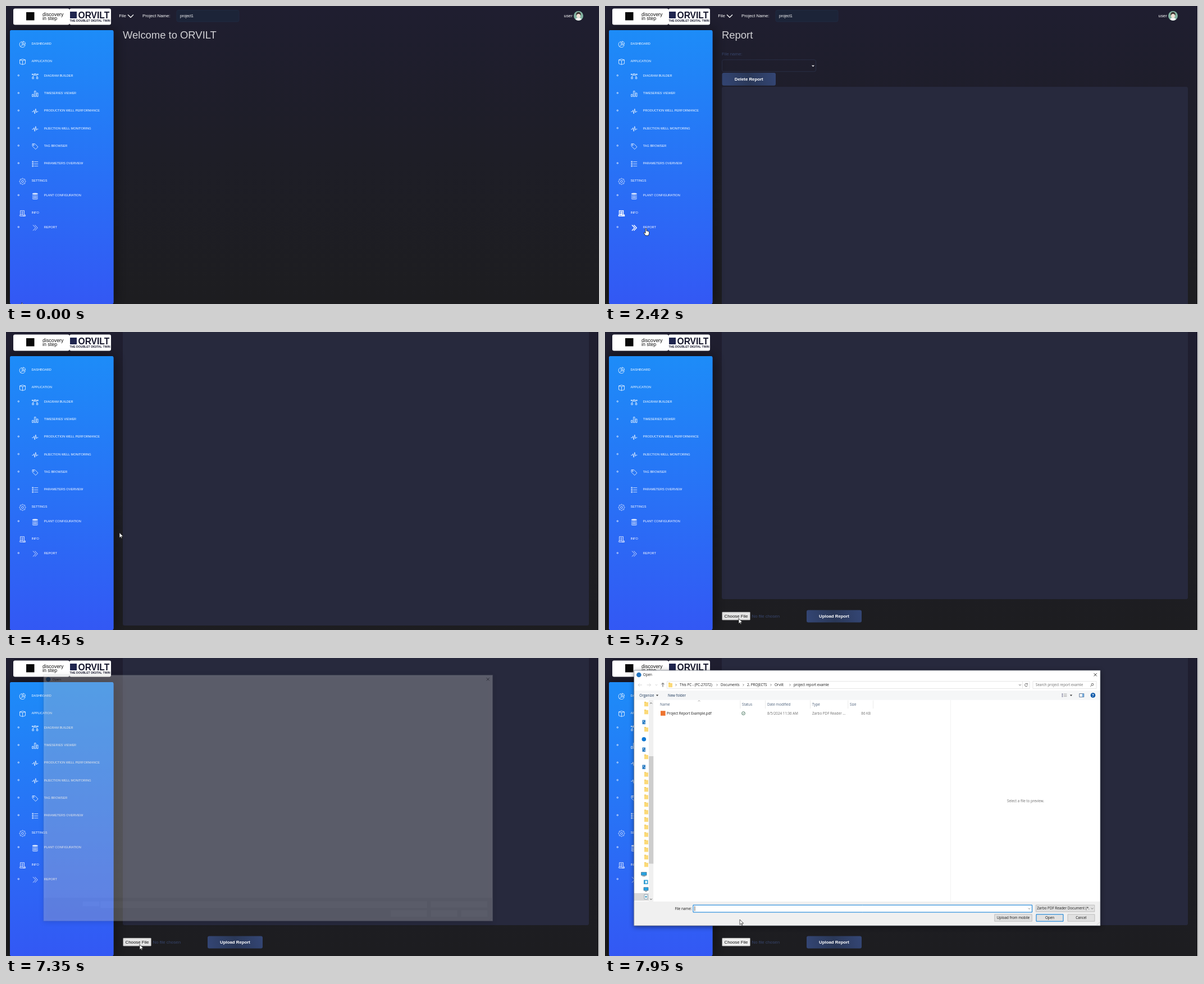
An HTML page with a canvas that plays this animation: 1056 by 531 pixels, repeating every 8 s.

```html
<!DOCTYPE html>
<html lang="en">
<head>
<meta charset="utf-8">
<title>Report upload</title>
<style>
  html, body { margin: 0; width: 100%; height: 100%; overflow: hidden; background: #1e1e26; }
  canvas { display: block; }
</style>
</head>
<body>
<canvas id="stage" width="1056" height="531"></canvas>
<script>
const ctx = document.getElementById('stage').getContext('2d');
const W = 1056, H = 531, LOOP = 8000, SCROLL = 224;
const APP = '"Liberation Sans", Arial, sans-serif';
const SYS = '"Open Sans", "Noto Sans", sans-serif';
const PAGE_AT = 2160, DIALOG_AT = 7350, LISTING_AT = 7590;

const clamp = v => Math.max(0, Math.min(1, v));
const smooth = v => { v = clamp(v); return v * v * (3 - 2 * v); };

function text(s, x, y, size, color = '#fff', opt = {}) {
  ctx.font = `${opt.weight || 400} ${size}px ${opt.font || APP}`;
  ctx.textAlign = opt.align || 'left';
  ctx.fillStyle = color;
  ctx.fillText(s, x, y);
}
const sys = (s, x, y, color = '#1a1a1a', align = 'left') =>
  text(s, x, y, 6.25, color, { font: SYS, align });

function rect(x, y, w, h, fill, stroke, r = 0, lw = 1) {
  ctx.beginPath();
  ctx.roundRect(x, y, w, h, r);
  if (fill) { ctx.fillStyle = fill; ctx.fill(); }
  if (stroke) { ctx.strokeStyle = stroke; ctx.lineWidth = lw; ctx.stroke(); }
}

function disc(x, y, r, fill, stroke, lw = 1) {
  ctx.beginPath();
  ctx.arc(x, y, r, 0, Math.PI * 2);
  if (fill) { ctx.fillStyle = fill; ctx.fill(); }
  if (stroke) { ctx.strokeStyle = stroke; ctx.lineWidth = lw; ctx.stroke(); }
}

function path(d, x, y, stroke, lw = 0.9, fill) {
  const p = new Path2D(d);
  ctx.save();
  ctx.translate(x, y);
  if (fill) { ctx.fillStyle = fill; ctx.fill(p); }
  if (stroke) { ctx.strokeStyle = stroke; ctx.lineWidth = lw; ctx.stroke(p); }
  ctx.restore();
}

function gradient(x0, y0, x1, y1, ...colors) {
  const g = ctx.createLinearGradient(x0, y0, x1, y1);
  colors.forEach((c, i) => g.addColorStop(i / (colors.length - 1), c));
  return g;
}

// Icon outlines, centred on 0,0
const ICONS = {
  pie: 'M-1 -4.6A5 5 0 1 0 4.6 1.2L-.6 1.2ZM1 -5.4V-.6H5.2A5 5 0 0 0 1 -5.4M-.6 1.2L-3.8 4',
  cube: 'M-5 -3.4L0 -4.8L5 -3.4V3.4L0 5L-5 3.4ZM-5 -3.4L0 -2L5 -3.4M0 -2V5',
  nodes: 'M-1.4 -4.4H1.4V-1.8H-1.4ZM-5 -3.2H-1.4M1.4 -3.2H5M-1.4 -2.6Q-3.6 -1.4 -3.8 1.6M1.4 -2.6Q3.6 -1.4 3.8 1.6' +
    'M-5 1.8H-2.6V4.6H-5ZM2.6 1.8H5V4.6H2.6ZM-5.4 -4H-4.2V-2.6H-5.4ZM4.2 -4H5.4V-2.6H4.2Z',
  bars: 'M-5.2 1H-2.9V5H-5.2ZM-1.2 -4.8H1.2V5H-1.2ZM2.9 -1.4H5.2V5H2.9Z',
  pulse: 'M-5.5 .8H-3.4L-2 -2L-.6 4.4L1 -4.4L2.4 2.4L3.4 .4H5.6',
  tag: 'M-4.8 -4.6H-.4L5.2 1L1 5.2L-4.8 -.4ZM-3.4 -2.4A.9 .9 0 1 0 -1.6 -2.4A.9 .9 0 1 0 -3.4 -2.4',
  list: 'M-1.8 -3.8H5.4M-1.8 0H5.4M-1.8 3.8H5.4M-5 -4.7H-3.3V-2.9H-5ZM-5 -.9H-3.3V.9H-5ZM-5 2.9H-3.3V4.7H-5Z',
  scroll: 'M-4 3V-5H3V4.8H-4.6A1.4 1.4 0 0 1 -4.6 2.6H1V4Q1.2 4.8 2 4.8H5V2.6H3M-2.2 -2.8H1.4M-2.2 -.8H1.4M-2.2 1.2H1.4',
  chevrons: 'M-3.8 -5L1 0L-3.8 5M-.4 -5L4.4 0L-.4 5',
  down: 'M-5 -2.3L0 2.5L5 -2.3',
  caret: 'M-1.8 -.9L0 .9L1.8 -.9',
  arrow: 'M0 0V9.2L2.2 7.2L3.7 10.4L5 9.8L3.6 6.8H6.6Z',
  hand: 'M-1 1Q0 -.6 1 1V5L2 4.8Q3 4.6 3.2 5.3Q4.4 5 4.5 5.9Q5.6 5.7 5.6 6.8V9.6L4.4 13H-1L-3.6 8.8Q-4 7.2 -2.6 7.4L-1 9Z'
};

function gear(x, y, color) {
  ctx.beginPath();
  for (let i = 0; i <= 64; i++) {
    const a = i / 64 * Math.PI * 2, r = 5 + 0.7 * Math.cos(a * 8);
    ctx.lineTo(x + r * Math.cos(a), y + r * Math.sin(a));
  }
  ctx.strokeStyle = color;
  ctx.lineWidth = 0.9;
  ctx.stroke();
  disc(x, y, 1.9, null, color, 0.9);
}

function database(x, y, color) {
  ctx.fillStyle = color;
  for (let i = 0; i < 4; i++) {
    ctx.beginPath();
    ctx.ellipse(x, y - 3.6 + i * 2.7, 5, 1.7, 0, i ? 0 : Math.PI, Math.PI * (i ? 1 : 3));
    if (i) ctx.ellipse(x, y - 4.7 + i * 2.7, 5, 1.5, 0, Math.PI, 0, true);
    ctx.fill();
  }
}

// label, text centre, icon, nested
const MENU = [
  ['DASHBOARD', 66.8, 'pie', 0],
  ['APPLICATION', 98, 'cube', 0],
  ['DIAGRAM BUILDER', 123.7, 'nodes', 1],
  ['TIMESERIES VIEWER', 155, 'bars', 1],
  ['PRODUCTION WELL PERFORMANCE', 186.2, 'pulse', 1],
  ['INJECTION WELL MONITORING', 217.5, 'pulse', 1],
  ['TAG BROWSER', 248.7, 'tag', 1],
  ['PARAMETERS OVERVIEW', 280, 'list', 1],
  ['SETTINGS', 311.2, 'gear', 0],
  ['PLANT CONFIGURATION', 337, 'database', 1],
  ['INFO', 368.2, 'scroll', 0],
  ['REPORT', 393.8, 'chevrons', 1]
];

function sidebar(hot) {
  ctx.save();
  ctx.shadowColor = 'rgba(0,0,0,.6)';
  ctx.shadowBlur = 25;
  rect(7, 43, 184.4, 488, '#2a6bf6', null, 3);
  ctx.restore();
  rect(7, 43, 184.4, 488, gradient(0, 43, 0, 531, '#1d8cf8', '#3358f4'), null, 3);

  MENU.forEach(([label, y, icon, nested], i) => {
    const lit = hot && i > 9, color = lit ? '#fff' : 'rgba(255,255,255,.8)';
    const x = nested ? 51.8 : 29.5, cy = y + 1.4;
    if (nested) disc(22.3, y, 1.2, null, '#fff', 0.8);
    if (icon === 'gear') gear(x, cy, color);
    else if (icon === 'database') database(x, cy, color);
    else path(ICONS[icon], x, cy, color, lit ? 1.4 : 0.95);
    text(label, nested ? 67.8 : 45.5, y + 2, 5.585);
  });

  rect(13, 4.5, 100, 29, '#fff', null, 3);
  rect(113, 4.5, 74, 29, '#fff', null, 3);
  rect(36, 11, 14.5, 14.5, '#0a0a0a');
  text('discovery', 65, 18, 8.9, '#111');
  text('in step', 65, 25.4, 8.9, '#111');
  rect(114, 10, 12, 12, '#20264f');
  text('ORVILT', 128.5, 22, 15.6, '#15162c', { weight: 700 });
  text('THE DOUBLET DIGITAL TWIN', 113.5, 27.8, 5.1, '#15162c', { weight: 700 });
}

function button(label, x, y, w, h) {
  rect(x, y, w, h, gradient(x + w, y, x, y + h, '#344675', '#2a3858', '#344675'), null, 3);
  text(label, x + w / 2, y + h / 2 + 2.8, 7.82, '#fff', { weight: 700, align: 'center' });
}

function header(right) {
  text('File', 201.3, 20.2, 7.82);
  path(ICONS.down, 222, 17.8, '#fff', 1.2);
  text('Project Name:', 243, 20.2, 7.82);
  rect(304, 7.5, 111, 20.5, '#1c2438', '#212c44', 3, 0.8);
  text('project1', 310, 20, 6.7);
  text('user', right - 34.4, 20.2, 7.82);

  const cx = right - 8.5;
  ctx.save();
  ctx.beginPath();
  ctx.arc(cx, 17.5, 8.5, 0, Math.PI * 2);
  ctx.clip();
  rect(cx - 9, 8, 18, 19, '#83b3a2');
  disc(cx, 27, 6.4, '#f2f4f3');
  disc(cx, 15, 4.3, '#3b332f');
  disc(cx, 17.4, 3.5, '#efe0d4');
  ctx.restore();
}

function page(t, mouse) {
  rect(0, 0, W, H, gradient(0, 0, 0, H, '#1f1e30', '#1e1e27', '#1d1d20'));
  const report = t >= PAGE_AT;
  const y = SCROLL * smooth((t - 4000) / 640);
  ctx.save();
  ctx.translate(0, -y);
  header(report ? 1020 : 1028);
  text(report ? 'Report' : 'Welcome to ORVILT', 208, 58.4, 18.43, '#d2d2d6');
  if (report) {
    const muted = '#37456c', bottom = 476 + SCROLL;
    text('File name:', 208, 87.8, 7.82, muted);
    rect(208.5, 95.8, 167, 21, null, '#2b3048', 3, 0.9);
    path(ICONS.caret, 370.5, 106.5, '#fff', 1.2);
    button('Delete Report', 208.5, 119, 95.5, 22.7);
    rect(208, 144, 830, bottom - 144, '#27293d', null, 3);

    const base = 499 + SCROLL;
    const over = mouse.x > 208 && mouse.x < 259 && mouse.y + y > base && mouse.y + y < base + 14.5;
    rect(208.5, base, 50, 14.2, over ? '#e5e5e5' : '#efefef', '#777', 1, 0.6);
    text('Choose File', 212.6, base + 9.7, 7.82, '#111');
    text('No file chosen', 261.5, base + 9.7, 7.82, muted);
    button('Upload Report', 359, base - 3.6, 98, 22.2);
  }
  ctx.restore();
  if (report) rect(1055, 0, 1, H, '#f1f1f1');
}

const folder = (x, y) => {
  rect(x, y - 4, 3.2, 2, '#e8b93f');
  rect(x, y - 3.2, 7, 7.4, '#fbd978');
};
const tower = y => {
  rect(66.5, y - 3.5, 5.5, 7.5, '#2f7fc4');
  rect(68, y - 2, 1.2, 1.2, '#fff');
  rect(70, y + 1, 1.2, 1.2, '#fff');
};
const screen = (x, y, w) => {
  rect(x, y - 3.2, w, 5.4, '#27a3e2', '#33566e', 0, 0.6);
  rect(x + 2, y + 3.2, w - 4, 0.9, '#567');
};

function controls(ready) {
  const face = ready ? '#e1e1e1' : '#fff';
  const edge = c => ready ? c : null;
  const box = (x, y, w, h, fill, line) => rect(x, y, w, h, fill, edge(line), 0, line === '#0078d7' ? 1 : 0.7);
  box(157, 440.2, 603.5, 12.8, '#fff', '#0078d7');
  box(767.3, 440.2, 104.5, 12, face, '#adadad');
  box(693.8, 456.8, 66.5, 12.4, face, '#adadad');
  box(768, 456.8, 48, 12.4, face, '#0078d7');
  box(824, 456.8, 48, 12.4, face, '#adadad');
  if (!ready) return rect(124, 441, 30.5, 8.5, '#fff');
  sys('File name:', 154.3, 448.5, '#111', 'right');
  rect(159.6, 442.2, 0.7, 8.6, '#111');
  path(ICONS.caret, 755.5, 446.6, '#555', 0.7);
  sys('Zarbo PDF Reader Document (*.', 769.3, 448.4);
  path(ICONS.caret, 867.5, 446.4, '#444', 0.7);
  sys('Upload from mobile', 727, 465.2, '#111', 'center');
  sys('Open', 792, 465.2, '#111', 'center');
  sys('Cancel', 848, 465.2, '#111', 'center');
}

function listing() {
  const grey = '#6d6d6d', line = '#dcdcdc';
  // address row
  path('M3.5 0H-3.5M-.8 -2.6L-3.5 0L-.8 2.6', 62.5, 48, '#ccc', 0.8);
  path('M-3.5 0H3.5M.8 -2.6L3.5 0L.8 2.6', 78, 48, '#ccc', 0.8);
  path(ICONS.caret, 91.5, 48, '#bbb', 0.7);
  path('M0 3.5V-3.5M-2.6 -.8L0 -3.5L2.6 -.8', 103, 48, '#444', 0.9);
  rect(110.5, 41.5, 645.5, 13, '#fff', line, 0, 0.7);
  rect(743, 41.5, 0.7, 13, line);
  folder(113, 48);
  [['This PC - (PC-27072)', 133], ['Documents', 206], ['2. PROJECTS', 253], ['Orvilt', 302],
    ['project report examle', 336]].forEach(([s, x]) => {
    path('M-.9 -1.7L.8 0L-.9 1.7', x - 6.5, 48, '#444', 0.7);
    sys(s, x, 50.2);
  });
  path(ICONS.caret, 739, 48, '#444', 0.8);
  path('M2 -1.5A2.5 2.5 0 1 0 2.5 .6M2.4 -2.8V-1.2H.8', 750, 48, '#444', 0.8);
  rect(762, 41.5, 113, 13, '#fff', line, 0, 0.7);
  sys('Search project report examle', 767, 50.2, grey);
  disc(868, 47.2, 1.9, null, '#444', 0.8);
  path('M0 0L-2.2 2.2', 866.6, 48.6, '#444', 0.9);

  // toolbar
  rect(52, 58, 829.5, 16.8, '#f5f6f7');
  sys('Organize', 61.3, 68.6, '#1e395b');
  path('M-2.2 -1H2.2L0 1.4Z', 93, 66.5, null, 0, '#333');
  sys('New folder', 112, 68.6, '#1e395b');
  for (let i = 0; i < 3; i++) {
    rect(813.5, 63.4 + i * 2.3, 2, 1.3, '#668');
    rect(817, 63.6 + i * 2.3, 5.5, 0.8, '#999');
  }
  path('M-2.2 -1H2.2L0 1.4Z', 830, 66.5, null, 0, '#333');
  rect(844.8, 63.5, 8, 6, '#fff', '#3c5a80', 0, 0.8);
  rect(850, 63.5, 2.8, 6, '#6ba5d8');
  disc(869, 66.4, 4.3, '#0b57a8');
  text('?', 869, 69, 7, '#fff', { weight: 700, align: 'center' });

  // columns and the single file
  [['Name', 98], ['Status', 244], ['Date modified', 289], ['Type', 369], ['Size', 436]]
    .forEach(([s, x]) => sys(s, x, 84.8, '#4c607a'));
  [240.5, 285, 365, 432.5, 477].forEach(x => rect(x, 75.5, 0.7, 14.5, '#e2e2e2'));
  path('M-1.8 .9L0 -.9L1.8 .9', 167.5, 76.5, '#777', 0.7);
  rect(99, 94.2, 8.6, 8.6, '#ee7430');
  sys('Project Report Example.pdf', 110, 101);
  disc(246.5, 98.6, 2.9, null, '#3c6b54', 0.9);
  path('M-1.3 0L-.3 1.1L1.5 -1.1', 246.5, 98.6, '#3c6b54', 0.8);
  sys('8/5/2024 11:36 AM', 289, 101, grey);
  sys('Zarbo PDF Reader ...', 369, 101, grey);
  sys('86 KB', 473, 101, grey, 'right');
  rect(615, 75, 0.8, 359, '#f0f0f0');
  sys('Select a file to preview.', 749, 257.2, '#6d6d6d', 'center');

  // folder tree
  rect(52, 419, 26, 13.5, '#d9d9d9');
  [82, 96, 127, 176].forEach(y => folder(70, y));
  for (let i = 0; i < 13; i++) folder(70, 207.3 + i * 13.4);
  [114, 163, 194].forEach(tower);
  disc(69.3, 144.8, 3.8, '#0f78d4');
  screen(64.5, 385, 9.5);
  rect(69, 395.5, 7.5, 7.5, '#2b9bd0');
  rect(71.5, 397, 3.5, 4.5, '#e4f3fb');
  screen(69, 412, 8);
  rect(70, 421.5, 6, 8, '#fff', '#6b8aa3', 0, 0.7);
  rect(71.5, 424, 3, 3, '#52a5c8');
}

function dialog(t) {
  const dt = t - DIALOG_AT;
  if (dt < 0) return;
  const ready = t >= LISTING_AT;
  const k = 1 - 0.037 * (1 - clamp(dt / 240)) ** 2;
  const layer = dialog.layer || (dialog.layer = new OffscreenCanvas(W, H).getContext('2d'));
  const screenCtx = ctx;
  draw.target(layer);
  ctx.clearRect(0, 0, W, H);
  ctx.save();
  ctx.translate(466.7, 249.5);
  ctx.scale(k, k);
  ctx.translate(-466.7, -249.5);
  rect(51.7, 22, 830.3, 455, '#fff');
  rect(51.7, 434, 830.3, 43, '#f0f0f0');
  disc(60.3, 30, 4.3, '#2373bd');
  sys('Open', 67.8, 32.3);
  path('M-2.6 -2.6L2.6 2.6M2.6 -2.6L-2.6 2.6', 873.2, 29.8, '#222', 0.9);
  if (ready) listing();
  if (dt >= 65) {
    rect(78, 75, 8.2, 359, '#f0f0f0');
    const [top, h] = ready ? [175, 191.5] : [141, 231];
    rect(78, top, 8.2, h, '#cdcdcd');
    path('M-1.8 .9L0 -.9L1.8 .9', 82, 80.5, '#444', 0.9);
    path(ICONS.caret, 82, 429.8, '#444', 0.9);
  }
  controls(ready);
  for (let i = 0; i < 3; i++) rect(879.5 - i * 1.8, 471 + i * 1.8, 1, 1, '#bbb');
  rect(51.7, 22, 830.3, 455, null, '#6f7480', 0, 0.7);
  ctx.restore();
  draw.target(screenCtx);

  ctx.save();
  ctx.globalAlpha = clamp(0.25 + dt * 0.0045);
  ctx.shadowColor = 'rgba(0,0,0,.45)';
  ctx.shadowBlur = 9;
  ctx.shadowOffsetY = 2;
  ctx.drawImage(layer.canvas, 0, 0);
  ctx.restore();
}

// Pointer way-points: time, x, y
const WAY = [
  [50, 28, 528.5], [810, 73, 394], [880, 73, 394], [1010, 73, 396], [2420, 73, 396],
  [3430, 218, 345], [3560, 218, 345], [3980, 202, 357.5], [5100, 202, 357.5],
  [5720, 238, 510.5], [7600, 238, 510.5], [7950, 240, 466]
];

function pointer(t) {
  const i = WAY.findIndex(p => p[0] > t);
  const b = WAY[i < 0 ? WAY.length - 1 : i], a = i > 0 ? WAY[i - 1] : b;
  const u = a === b ? 0 : smooth((t - a[0]) / (b[0] - a[0]));
  return { x: a[1] + (b[1] - a[1]) * u, y: a[2] + (b[2] - a[2]) * u };
}

function cursor(t, { x, y }, link) {
  if (link) path(ICONS.hand, x, y, '#111', 0.8, '#fff');
  else path(ICONS.arrow, x, y, '#111', 0.7, '#fff');
  if (t >= 6530 && t < 7210) {
    const a = t / 160;
    disc(247, 508, 3.2, null, '#9bd8f2', 1.4);
    ctx.beginPath();
    ctx.arc(247, 508, 3.2, a, a + 2);
    ctx.strokeStyle = '#1673c4';
    ctx.stroke();
  }
}

function tooltip(t) {
  if (t < 5990 || t >= 6390) return;
  ctx.globalAlpha = clamp((t - 5960) / 180);
  rect(242, 520, 52.5, 10.6, '#fff', '#8a8a8a', 0, 0.6);
  sys('No file chosen', 246, 527.6, '#444');
  ctx.globalAlpha = 1;
}
</script>
<script>
// Drawing helpers share one context; the dialog is composed on its own layer.
const draw = (() => {
  const main = ctx;
  const helpers = ['save', 'restore', 'translate', 'scale', 'clearRect', 'beginPath', 'roundRect', 'arc',
    'fill', 'stroke', 'fillText'];
  const props = ['font', 'textAlign', 'fillStyle', 'strokeStyle', 'lineWidth'];
  const own = Object.getPrototypeOf(main);
  function target(next) {
    if (next === main) {
      helpers.concat(props).forEach(n => delete main[n]);
      return;
    }
    helpers.forEach(n => { main[n] = (...args) => next[n](...args); });
    props.forEach(n => Object.defineProperty(main, n, {
      configurable: true, get: () => next[n], set: v => { next[n] = v; }
    }));
  }
  return { target, own };
})();

const start = performance.now();
function frame() {
  const t = (performance.now() - start) % LOOP;
  const mouse = pointer(t);
  const hot = mouse.x < 191 && mouse.y > 355 && mouse.y < 411;
  page(t, mouse);
  sidebar(hot);
  tooltip(t);
  dialog(t);
  cursor(t, mouse, hot && mouse.x > 40 && mouse.y > 380 && mouse.x < 185);
  requestAnimationFrame(frame);
}
frame();
</script>
</body>
</html>
```
